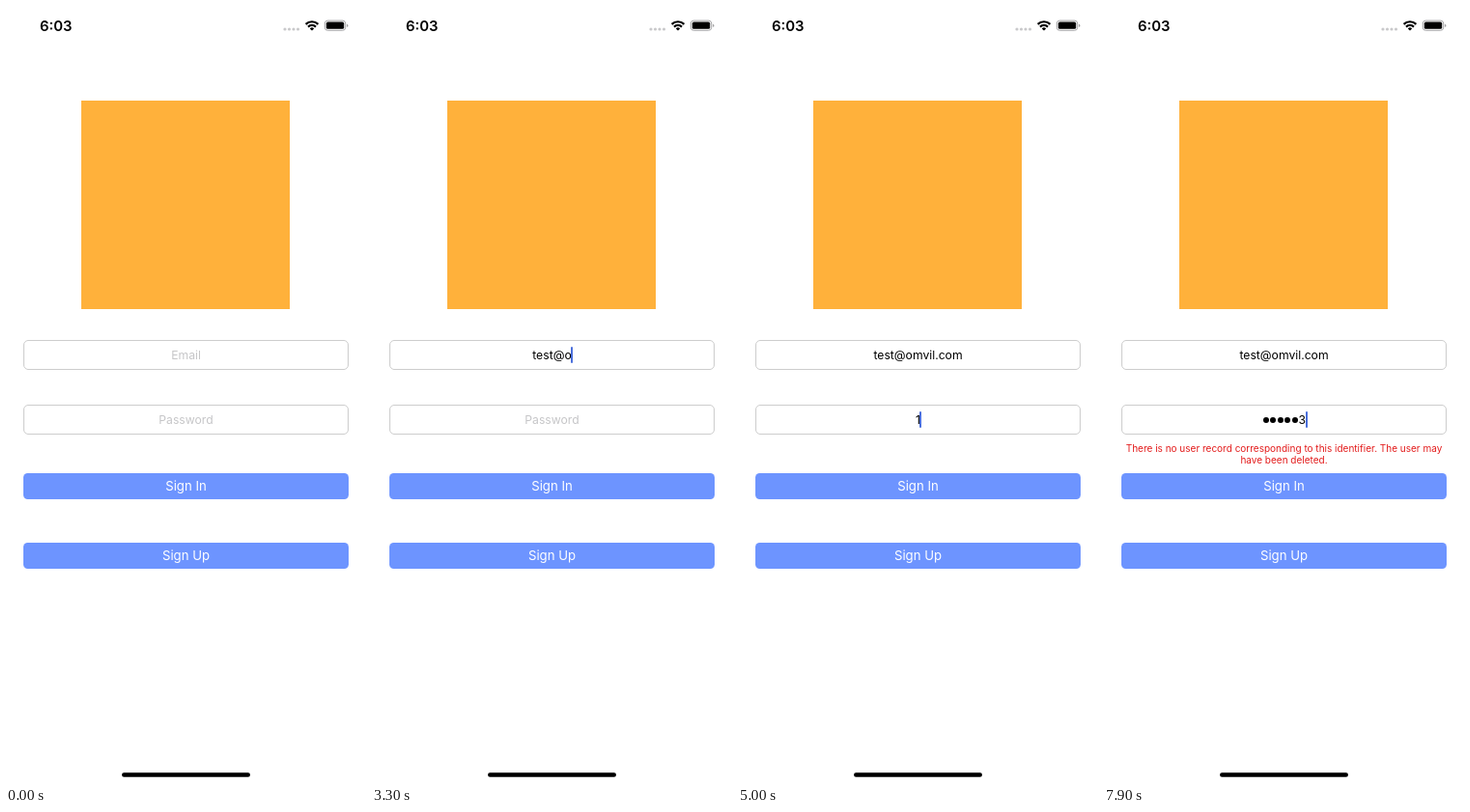
Write an HTML page that moves like this. It is 373 px wide and 806 px high and loops after 8 s.

```html
<!DOCTYPE html>
<html lang="en">
<head>
<meta charset="utf-8">
<title>Sign in</title>
<style>
  html, body { margin: 0; width: 100%; height: 100%; overflow: hidden; background: #fff; }
  body { font-family: Inter, "Liberation Sans", sans-serif; }
  body > * { position: absolute; }
  .clock { left: 35px; top: 12px; font: 600 14.9px/18px Inter, sans-serif; }
  .status { left: 280px; top: 8px; }
  .logo { left: 78px; top: 98px; width: 216px; height: 216px; background: #ffb13b; }
  .field, .button {
    left: 18px; width: 337px; box-sizing: border-box;
    display: flex; justify-content: center; align-items: center; white-space: pre;
  }
  .field {
    height: 31px; border: 1px solid #cdcdcd; border-radius: 5px;
    font-size: 12.2px; line-height: 16px; padding-top: 1px;
  }
  .button {
    height: 27px; border-radius: 4.5px; background: #6d94ff; padding-bottom: 1px;
    color: #fff; font-size: 13.2px; line-height: 18px;
  }
  .hint { position: absolute; color: #c6c6c8; }
  .value { position: relative; height: 16px; }
  .caret {
    position: absolute; left: 100%; top: -1px; margin-left: -.5px;
    width: 2px; height: 17px; border-radius: 1px; background: #4a6fdc; opacity: 0;
  }
  .dot {
    display: inline-block; width: 6px; height: 6px; margin: 0 .75px;
    border-radius: 50%; background: #000; vertical-align: 1.5px;
  }
  .error {
    left: 0; top: 452px; width: 373px; text-align: center; white-space: pre;
    font-size: 10px; line-height: 12px; color: #e31b1b;
  }
  .home { left: 120px; top: 794px; }
</style>
</head>
<body>
<div class="clock">6:03</div>
<svg class="status" width="80" height="24">
  <g fill="#c9c9cb">
    <circle cx="9" cy="16" r="1.6"/><circle cx="13.5" cy="16" r="1.6"/>
    <circle cx="18" cy="16" r="1.6"/><circle cx="22.5" cy="16" r="1.6"/>
  </g>
  <g fill="none" stroke="#000" stroke-width="2.2">
    <path d="M30.6 10.9a9.1 9.1 0 0 1 12.8 0M33 13.6a5.7 5.7 0 0 1 8 0"/>
    <path d="M37 17.6l-2.2-2.2a3.1 3.1 0 0 1 4.4 0z" fill="#000" stroke="none"/>
  </g>
  <rect x="50.3" y="7.1" width="21.4" height="10.2" rx="3" fill="none" stroke="#a3a3a5"/>
  <rect x="51.8" y="8.6" width="18.4" height="7.2" rx="1.6"/>
  <path d="M73 10.5q1.4.5 1.4 1.7t-1.4 1.7z" fill="#a3a3a5"/>
</svg>
<div class="logo"></div>

<div class="field" style="top:346px"><span class="hint">Email</span><span class="value"><span class="text"></span><i class="caret"></i></span></div>
<div class="field" style="top:413px"><span class="hint">Password</span><span class="value"><span class="text"></span><i class="caret"></i></span></div>
<div class="error" id="error">There is no user record corresponding to this identifier. The user may
have been deleted.</div>
<div class="button" style="top:484px"><span id="signIn">Sign In</span></div>
<div class="button" style="top:556px"><span>Sign Up</span></div>
<svg class="home" width="133" height="6"><rect y=".3" width="133" height="4.5" rx="2.25"/></svg>

<script>
const LOOP = 8000;
const inputs = [
  { value: 'test@omvil.com', focus: 480, blur: 4780, secret: false,
    keys: [1180, 1380, 1580, 1780, 2980, 3280, 3480, 3620, 3780, 3940, 4180, 4320, 4440, 4580] },
  { value: '123123', focus: 4780, blur: LOOP, secret: true,
    keys: [4980, 5280, 5480, 5780, 5980, 6280] }
];
document.querySelectorAll('.field').forEach((field, i) => {
  for (const part of ['hint', 'text', 'caret'])
    inputs[i][part] = field.querySelector('.' + part);
});
const error = document.getElementById('error');
const signIn = document.getElementById('signIn');
const clamp = x => Math.max(0, Math.min(1, x));

// Solid after each key, then a soft one-second blink.
function blink(s) {
  if (s < .6) return 1;
  const p = s % 1;
  if (p < .1) return .5 + 5 * p;
  return p < .83 ? clamp((.77 - p) / .14) : clamp((p - .9) * 5);
}

function drawInput(f, t) {
  const count = f.keys.filter(k => k <= t).length;
  if (count !== f.count) {
    f.count = count;
    const typed = f.value.slice(0, count);
    f.text.innerHTML = f.secret
      ? '<b class="dot"></b>'.repeat(Math.max(0, count - 1)) + typed.slice(-1)
      : typed;
    f.hint.style.opacity = count ? 0 : 1;
  }
  const last = count ? f.keys[count - 1] : f.focus;
  f.caret.style.opacity = t >= f.focus && t < f.blur ? blink((t - last) / 1000) : 0;
}

function draw() {
  const t = performance.now() % LOOP;
  inputs.forEach(f => drawInput(f, t));
  signIn.style.opacity = t < 6980 ? 1 : .35 + .65 * clamp((t - 7120) / 250);
  error.style.visibility = t < 7480 ? 'hidden' : 'visible';
  requestAnimationFrame(draw);
}
draw();
</script>
</body>
</html>
```
